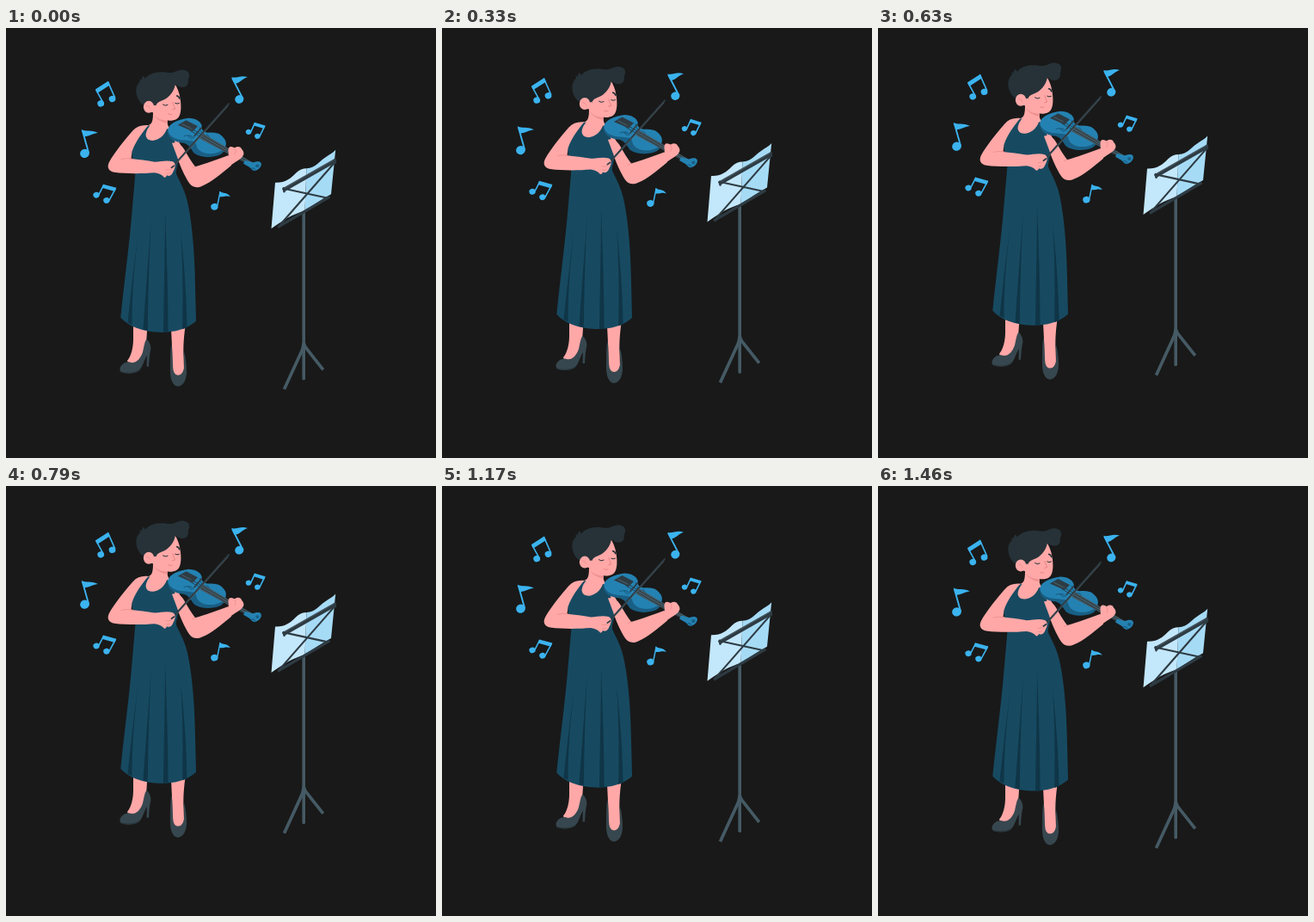
An HTML page with a canvas for the animation above (1.5 s loop, 500 by 500 pixels).

```html
<!DOCTYPE html>
<html lang="en">
<head>
<meta charset="utf-8">
<title>Violinist</title>
<style>
html, body { margin: 0; width: 100%; height: 100%; overflow: hidden; background: #191919; }
canvas { display: block; width: 500px; height: 500px; }
</style>
</head>
<body>
<canvas id="stage" width="500" height="500"></canvas>
<script>
const ctx = document.getElementById('stage').getContext('2d');
const LOOP = 1500, STEPS = 36, LIFT = 9.8, REST = 0.4;
const C = {
  back: '#191919', skin: '#ffa8a7', shade: '#ef8f90', hair: '#263238', shoe: '#37474f',
  dress: '#174a61', pleat: '#0f3547', wood: '#2482b2', woodDark: '#195f85', steel: '#455a64',
  dark: '#2e3b43', note: '#3bb3ef', pageL: '#c3e7fb', pageR: '#a6dbf6'
};

const fill = (color, d) => {
  ctx.fillStyle = color;
  ctx.fill(new Path2D(d));
};
const line = (color, width, d, cap = 'round') => {
  ctx.strokeStyle = color;
  ctx.lineWidth = width;
  ctx.lineCap = cap;
  ctx.lineJoin = 'round';
  ctx.stroke(new Path2D(d));
};
const oval = (color, x, y, rx, ry, turn = 0) => {
  ctx.fillStyle = color;
  ctx.beginPath();
  ctx.ellipse(x, y, rx, ry, turn, 0, Math.PI * 2);
  ctx.fill();
};

function drawNotes() {
  const head = (x, y, r) => oval(C.note, x, y, r, r * 0.94, -0.3);
  const beamed = (heads, r, stems, beam) => {
    heads.forEach(([x, y]) => head(x, y, r));
    line(C.note, 1.6, stems);
    fill(C.note, beam);
  };
  beamed([[110.2, 88], [123.5, 82.6]], 3.9, 'M105 72.5L113 87M118.6 63L126.6 81',
    'M104 71.5L118.8 62L121 66.5L106.2 76Z');
  beamed([[105, 194.3], [116.8, 200.6]], 3.6, 'M113.5 183L107.8 194M127.3 187L120 200.5',
    'M113 181.8L128.4 186L126.4 190.2L111.4 186Z');
  beamed([[282, 121], [292.3, 126]], 3.2, 'M289.3 111L284.6 121M300.6 114.5L295 126',
    'M289 109.8L301.6 113.6L300 117.2L287.6 113.4Z');

  head(91.5, 146, 5.4);
  line(C.note, 1.9, 'M89 120L96 145');
  fill(C.note, 'M87.6 118.2C93 121.2 99 118 107 122.2C102 122.4 97.5 126.2 90.6 126.5Z');
  head(271.3, 83, 5.1);
  line(C.note, 1.9, 'M263.4 59L275.3 82');
  fill(C.note, 'M262.2 57.4C268 59 273 54.4 281 57.2C275.5 58.6 272.5 64.2 266 65Z');
  head(242.3, 208, 4.1);
  line(C.note, 1.5, 'M249 191L245.5 208');
  fill(C.note, 'M248.4 190C252 193.2 257.5 190.8 260.8 196.4C256.5 194.6 252.5 197 248 196.4Z');
}

function drawLegs() {
  fill(C.skin, 'M148 344L164.5 344C163.6 357 163.8 365 161.5 374L156 389L143 392L141 387C145.5 382 148 372 148 362Z');
  fill(C.skin, 'M191.8 346L208.6 346C206.8 360 206 370 206.5 380L207 397Q205 405 200 405Q194 404.5 193.4 397L193.2 374Z');
  fill(C.shoe, 'M132.6 395.5C135 389.5 140 388.5 143 388.5C150 391.5 156 386 159 377C160.5 371 161 365 163.5 362C166 364 169 369 168.3 374C167 379 166.4 386 166 394L163.6 394L163.8 381C160 388 158.5 395 154.5 399C149 403 137 402.5 133.5 400Q132 398 132.6 395.5Z');
  line('#263238', 1, 'M133.5 400C141 402.3 151 402 156 397');
  fill(C.shoe, 'M192.4 367C193.7 378 193.8 390 194.4 397C195.5 406 204 406 206.5 398C208 392 206.8 383 206.5 375C209 382 210 392 210 401C209.5 410 206 416.5 200 417C194 416.5 191.3 409 191 401C191 388 190.8 376 192.4 367Z');
}

function drawTorso() {
  fill(C.skin, 'M171 95L188 104C187 111 188 115 191 117L203 136L198 152L150 152L150 132C152 121 158 115 165 113.5C171 112 171 106 171 95Z');
  fill(C.shade, 'M172 101C176 106 182 108 188 108L187.8 110.5C181 110 175 107 172 101Z');
  fill(C.dress, 'M167.5 113.5C162.5 120 160.5 126.5 165.5 130C173 134 184 127 187 117.5L191.5 118C197 127 196 138 200 150C201.5 158 197 163 198 170C202 179 209 190 212 207C217 232 219.5 266 220 300L221 341C210 351 194 354.5 178 354C159 353.5 142 347 133.3 337C136 309 141 271 145 231L150.5 168L146.5 148C145 136 153 122 164 114Z');
  fill(C.pleat, 'M155 230C149.5 270 146.5 310 146.5 345.5L141.5 343C146 300 150 265 155 230Z');
  fill(C.pleat, 'M169 219C166.5 265 165.5 305 164.8 352L159.4 351C163 300 166 262 169 219Z');
  fill(C.pleat, 'M185 215C187 262 188.4 308 188.6 354L183 354C183.5 308 185 262 185 215Z');
  fill(C.pleat, 'M203 237C207 271 210 311 210.5 348.5L205.2 350.5C206 311 205.5 272 203 237Z');
}

function drawHead() {
  fill(C.skin, 'M168 78L196 65C199 69 201.5 75 202.5 82C204 91 203.8 99 201 103.5C198 108.5 189 109 183 106.5C177 104 173 101 171 97Z');
  fill(C.hair, 'M166 92C158 91 152.5 84 151.6 76C150.7 69 153 65 156 62.5L155.2 59.5L158 60.5Q157.5 57.5 160 56L162 59C164.5 55 171 52 179 51.5C187 51 192 54 198 50.5C203 48 211.5 48 213 54C213.6 57 211.5 59.5 211.8 62C212.5 68 206 71.5 199.5 67.5L197 65.5C195.5 73 191.5 79.5 184 83.5C179 86 175 86 173.5 93Z');
  oval(C.skin, 166, 92, 6.2, 7);
  fill(C.skin, 'M169 91L174 90L176 100L169 98Z');
  line(C.shade, 0.9, 'M163.5 90.5Q166.5 90 168 94');
  line(C.hair, 1, 'M182.5 89.2Q185 91.4 188 89.6M196.8 87.6Q199 89 201.5 87.6');
  line(C.hair, 1.8, 'M198.8 79Q201 79.5 201.8 82');
  line('#e57f83', 0.9, 'M193.8 87Q195.8 92 196.6 94.3L193.6 95M188.5 100Q190.5 101.5 193 100.4');
}

function drawViolin() {
  fill(C.woodDark, 'M188 119C188 130 197 133 207 134C213 136 215 141 219 146C228 152 241 151 249 147.5C254 145 257 139 255 132L238 127L207 117Z');
  fill(C.wood, 'M188.3 118C190 111 200 106.5 212 105C221 105 226.5 109 227.8 114C226.5 117.5 229 121.5 235 121.8C240 121.5 247 122 250 124.8C255 129 257.5 133 254.5 139C250.5 145 241 147.5 233 146C225 144 221.5 140 221 135C219 130.5 213 131.5 207 130.5C197 130 188.5 126 188.3 118Z');
  line(C.woodDark, 1.1, 'M207 126Q214 123 218 128M225 116Q226 123 233 125M216 129L211 125M234 124L237 128');
  fill(C.dark, 'M199.8 113L209.5 107.5L223 114.5L217 120.5Z');
  line(C.steel, 1.2, 'M205 112L219 119');
  fill(C.steel, 'M228.5 122.5L286 156.2L283.5 160L225.5 128.8Z');
  line('#1d2930', 0.7, 'M216 117.5L284 157M214 119.5L282 158.5');
  line(C.dark, 1.6, 'M219 126L227 116.5');
  fill(C.wood, 'M278 154L287 156.5C290 155.5 295.5 154 296.8 157.5C297.5 161 294.5 165 289 166.5C286 166 285 163.5 283 162L276 158Z');
  oval(C.woodDark, 292.3, 160.4, 2.1, 1.9);
  line(C.woodDark, 1.3, 'M285.5 163.5Q288 162 289.5 165');
}

function drawFrontArm() {
  fill(C.skin, 'M193 134C199 132.5 203.5 135 207 141C211 148 215 155 220 161.5C231 158.5 246 153 258 148.5L262 160C250 170 239 179.5 228 183.8C222 186.5 217 185.7 213 180.5C207.5 172 202 160 199 150Z');
  line(C.shade, 0.9, 'M220 161.5L216.5 163');
}

// Fingers wrap over the violin's neck.
function drawHand() {
  fill(C.skin, 'M258 149.5C260 147.5 257.5 143 259 139.8C261 136.8 264 138.8 266 139.5C269 137.3 273 137.7 274 141C276.5 143.5 277.5 147 275 149.6C272 153.5 266 155.8 260 161L256 155Z');
  line(C.shade, 0.9, 'M265.8 140Q268.5 143.5 266 147');
}

function drawBowArm() {
  line(C.dark, 2, 'M259 88.3L194 161');
  line('#52656e', 0.7, 'M258 91L199 157');
  fill(C.skin, 'M165.5 113.3C158 112.5 152 114.5 147.5 119.5C138 130.5 126 145 119.8 156.5C117 162.5 119.5 166.8 126 168C141 170 160 169.5 173 168.5C178 169.5 181 170.5 183 173C184.5 175.5 186.5 173 187 171.5C190.5 173.5 193.5 170.5 194.5 167C197 163 198 157.5 194 155.5C187 153.5 180 155.5 173 155.8C164 154.5 154 153 145.5 152.2L146.5 144C150 133 158 122 165.5 113.3Z');
  line(C.shade, 0.9, 'M134 152.7Q140 150.8 147 152.3M186 165L192 164.8M186.5 169.3L191 168.6');
  line(C.dark, 1.7, 'M195.5 160.3L192.4 162.6');
}

function drawStand() {
  line(C.steel, 3.6, 'M346.2 212L346.2 408');
  line(C.steel, 3.7, 'M346.6 370L323.5 420.3M347 370L368.8 397.6', 'butt');
  fill(C.steel, 'M344.4 366L348 366L350.5 373L342.5 377Z');
  fill(C.pageL, 'M313 180C324 180.5 331 175.5 337 169C341 165.2 345 163.5 349.5 163.5L347.5 213C334 216 322 224 308.5 233.5Z');
  fill(C.pageR, 'M349.5 163.5C360 163 364 155.5 371 151C376 147.5 380 145.5 383.2 142L378 193.5C368 199 358 205.5 347.5 213Z');
  line(C.dark, 2.1, 'M318 230L381 158M328 188L374 198');
  line(C.dark, 3.2, 'M316 232L376.5 196.5', 'butt');
  line(C.dark, 4.6, 'M322 189L383.5 154', 'butt');
  line('#4a5c66', 1, 'M323 186.9L383 152.5', 'butt');
  line(C.dark, 2.4, 'M322.8 186.5L323.5 190.5M382.8 153L382.8 157');
}

function drawLayer(shift, ...parts) {
  ctx.save();
  ctx.translate(0, shift);
  parts.forEach(part => part());
  ctx.restore();
}

// Everything rises and falls linearly, lowest at the last step; the stand travels twice as far.
function render(now) {
  const step = Math.floor((now % LOOP) / LOOP * STEPS + 0.05) % STEPS;
  const phase = (step + 1) % STEPS / STEPS;
  const shift = REST - LIFT * (1 - Math.abs(2 * phase - 1));
  ctx.fillStyle = C.back;
  ctx.fillRect(0, 0, 500, 500);
  drawLayer(shift, drawNotes, drawLegs, drawTorso, drawFrontArm, drawViolin, drawHead, drawHand, drawBowArm);
  drawLayer(shift * 2, drawStand);
}

const start = performance.now();
function tick() {
  render(performance.now() - start);
  requestAnimationFrame(tick);
}
tick();
</script>
</body>
</html>
```
